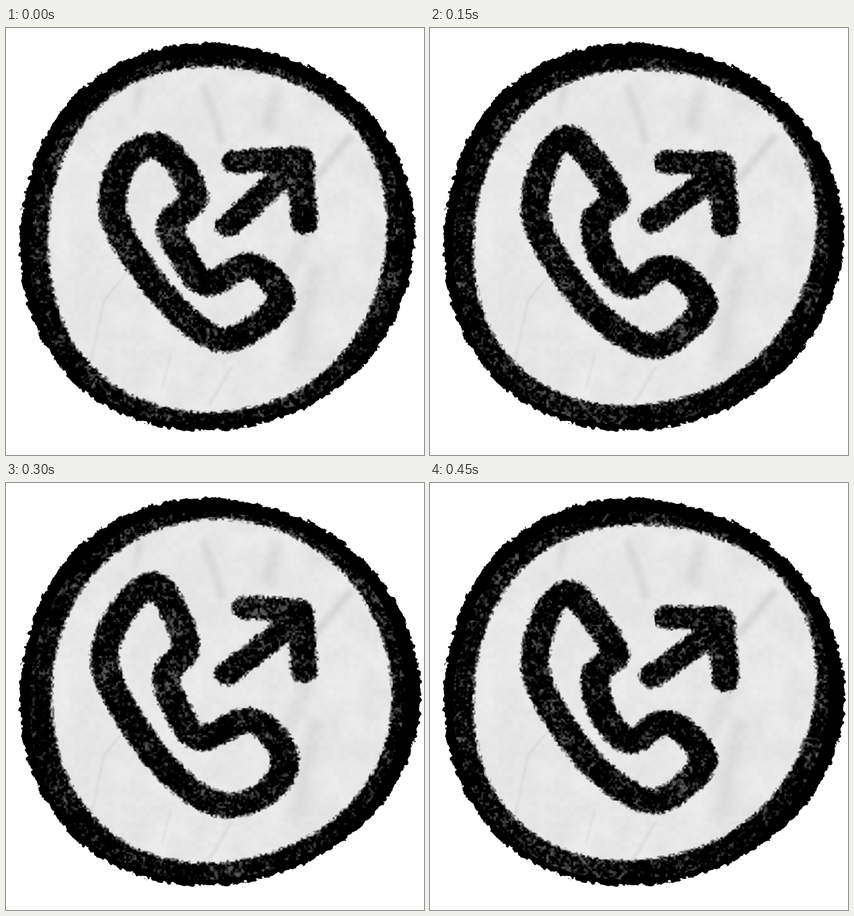
Write an HTML page with a canvas that moves like this. It is 741 px wide and 756 px high and loops after 0.6 s.

```html
<!DOCTYPE html>
<html lang="en">
<head>
<meta charset="utf-8">
<title>Outgoing call</title>
<style>
  html, body { margin: 0; width: 100%; height: 100%; overflow: hidden; background: #fff; }
  canvas { display: block; }
</style>
</head>
<body>
<canvas id="stage" width="741" height="756"></canvas>
<script>
const W = 741, H = 756, HOLD = 150, CX = 376;
const stage = document.getElementById('stage').getContext('2d');
const clamp = (v, lo = 0, hi = 1) => Math.min(hi, Math.max(lo, v));

// Wobble of a round outline: cosine and sine amounts for 1, 2, 3 and 4 waves per turn
const rimWaves = [-6, 1.2, 3.7, -2.6, 4.4, .6, -3.1, -.9];

// paper: hole in the ring; phone, head, shaft: centre lines of the chalk strokes
const poses = [
  {
    seed: 11, radius: 307, waves: [-4.4, 0, -2.9, -3.5, 3.3, -2.3, -4, -1.1],
    phone: [255,208, 290,222, 334,298, 292,345, 312,400, 355,453, 435,420,
            488,478, 440,530, 372,550, 280,475, 193,340, 205,245],
    head: [406,237, 522,230, 529,345], shaft: [394,351, 510,245]
  },
  {
    seed: 23, radius: 304, waves: [0, -3, 3.2, -8.2, 4.4, -1.6, -3.7, -1.7],
    phone: [240,195, 272,215, 328,300, 293,340, 308,410, 355,457, 420,424,
            484,484, 440,545, 375,560, 275,483, 190,345, 203,240],
    head: [420,238, 516,240, 524,350], shaft: [394,343, 505,262]
  },
  {
    seed: 37, radius: 305, waves: [2.4, -1.6, -1.4, -2.4, 4.2, 2.2, -1.9, .9],
    phone: [252,181, 283,200, 319,288, 284,340, 304,402, 345,452, 435,420,
            494,485, 460,550, 370,567, 268,487, 180,340, 192,250],
    head: [424,220, 522,227, 529,334], shaft: [392,338, 505,250]
  }
];

function layer(fill) {
  const c = document.createElement('canvas');
  c.width = W;
  c.height = H;
  const g = c.getContext('2d', { willReadFrequently: true });
  if (fill) {
    g.fillStyle = fill;
    g.fillRect(0, 0, W, H);
  }
  return g;
}

// Wobbly disc, optionally swollen towards one side
function blob(g, color, cy, radius, waves, swell = 0, side = 0) {
  g.fillStyle = color;
  g.beginPath();
  for (let a = 0; a < Math.PI * 2; a += .02) {
    let r = radius + swell * Math.max(0, Math.cos(a - side)) ** 6;
    for (let k = 1; k <= 4; k++) {
      r += waves[k * 2 - 2] * Math.cos(k * a) + waves[k * 2 - 1] * Math.sin(k * a);
    }
    g.lineTo(CX + r * Math.cos(a), cy + r * Math.sin(a));
  }
  g.fill();
}

// Closed smooth curve through flat x,y pairs
function loop(g, pts) {
  const n = pts.length / 2;
  const at = i => [pts[(i + n) % n * 2], pts[(i + n) % n * 2 + 1]];
  g.beginPath();
  g.moveTo(pts[0], pts[1]);
  for (let i = 0; i < n; i++) {
    const [a, b, c, d] = [at(i - 1), at(i), at(i + 1), at(i + 2)];
    g.bezierCurveTo(
      b[0] + (c[0] - a[0]) / 6, b[1] + (c[1] - a[1]) / 6,
      c[0] - (d[0] - b[0]) / 6, c[1] - (d[1] - b[1]) / 6, c[0], c[1]);
  }
  g.closePath();
}

function line(g, pts) {
  g.beginPath();
  for (let i = 0; i < pts.length; i += 2) g.lineTo(pts[i], pts[i + 1]);
}

// The chalk tip is wider than it is tall
function chalk(g, width) {
  g.save();
  g.strokeStyle = '#fff';
  g.lineCap = g.lineJoin = 'round';
  g.lineWidth = width;
  g.scale(1, .86);
  g.stroke();
  g.restore();
}

// Red channel as 0..1, softened
function read(g, blur) {
  const out = layer();
  out.filter = `blur(${blur}px)`;
  out.drawImage(g.canvas, 0, 0);
  const data = out.getImageData(0, 0, W, H).data;
  return Float32Array.from({ length: W * H }, (_, i) => data[i * 4] / 255);
}

function random(seed) {
  let s = seed * 7919 + 1;
  return () => {
    s = (s + 0x6D2B79F5) | 0;
    let t = Math.imul(s ^ (s >>> 15), 1 | s);
    t = (t + Math.imul(t ^ (t >>> 7), 61 | t)) ^ t;
    return ((t ^ (t >>> 14)) >>> 0) / 4294967296;
  };
}

// Smooth value noise around zero, with cells of the given size
function noise(size, seed) {
  const rnd = random(seed), cols = Math.ceil(W / size) + 2, rows = Math.ceil(H / size) + 2;
  const grid = Float32Array.from({ length: cols * rows }, () => rnd() - .5);
  const out = new Float32Array(W * H);
  const ease = t => t * t * (3 - 2 * t);
  for (let y = 0, k = 0; y < H; y++) {
    const gy = Math.floor(y / size), v = ease(y / size - gy);
    for (let x = 0; x < W; x++, k++) {
      const gx = Math.floor(x / size), u = ease(x / size - gx), i = gy * cols + gx, j = i + cols;
      const top = grid[i] + (grid[i + 1] - grid[i]) * u;
      const low = grid[j] + (grid[j + 1] - grid[j]) * u;
      out[k] = top + (low - top) * v;
    }
  }
  return out;
}

function makePaper() {
  const g = layer('#e7e7e7');
  const fold = (x1, y1, x2, y2, width, alpha) => {
    g.filter = `blur(${1 + width / 4}px)`;
    g.strokeStyle = `rgba(150,150,150,${alpha})`;
    g.lineWidth = width;
    line(g, [x1, y1, x2, y2]);
    g.stroke();
  };
  fold(238, 100, 228, 155, 12, .15);
  fold(350, 100, 384, 205, 13, .15);
  fold(482, 100, 462, 180, 22, .14);
  fold(612, 190, 545, 270, 14, .22);
  fold(535, 350, 495, 450, 24, .14);
  fold(550, 420, 510, 600, 26, .12);
  fold(150, 590, 174, 482, 2, .2);
  fold(174, 482, 212, 436, 2, .2);
  fold(276, 640, 292, 580, 2, .18);
  fold(360, 668, 400, 600, 4, .18);
  const broad = noise(34, 2), mottle = noise(9, 3), fine = noise(3, 4);
  return read(g, .5).map((v, i) => v + broad[i] * .03 + mottle[i] * .02 + fine[i] * .008);
}

// Noise may only move an edge where the mask is neither empty nor full
const near = m => Math.min(1, 5 * m * (1 - m));

const lump = noise(8, 5), nick = noise(3.5, 6);

function makeRim(swell, side) {
  const g = layer('#000');
  blob(g, '#fff', 369, 349, rimWaves, swell, side);
  return read(g, 4).map((m, i) =>
    clamp((m - .5 + near(m) * (lump[i] * .6 + nick[i] * .4)) * 8 + .5));
}

function makeInk({ seed, radius, waves, phone, head, shaft }) {
  const g = layer('#fff');
  blob(g, '#000', 372, radius, waves);
  loop(g, phone);
  chalk(g, 50);
  for (const pts of [head, shaft]) {
    line(g, pts);
    chalk(g, 47);
  }
  const fray = noise(4, seed), dust = noise(3.7, seed + 1);
  const grit = noise(7, seed + 2), drift = noise(30, seed + 3);
  return read(g, 4.2).map((m, i) => {
    const edge = clamp((m - .5 + near(m) * fray[i] * .65) * 1.8 + .5);
    const grain = dust[i] * .45 + grit[i] * .35 + drift[i] * .2;
    return edge * (1 - clamp((grain - .02) * 1.3, 0, .38));
  });
}

const paper = makePaper();

// The textured disc sits inside the solid silhouette
const discLayer = layer('#000');
blob(discLayer, '#fff', 376, 332, rimWaves);
const disc = read(discLayer, .6);

function compose(ink, rim) {
  const g = layer(), img = g.createImageData(W, H), px = img.data;
  ink.forEach((v, i) => {
    const shade = paper[i] * (1 - v) * disc[i];
    px.fill(255 * (1 - rim[i] + shade * rim[i]), i * 4, i * 4 + 3);
    px[i * 4 + 3] = 255;
  });
  g.putImageData(img, 0, 0);
  return g.canvas;
}

const [inkA, inkB, inkC] = poses.map(makeInk);
const rimA = makeRim(0, 0), rimB = makeRim(9, 0), rimC = makeRim(12, .2);
const cels = [compose(inkA, rimA), compose(inkB, rimB), compose(inkC, rimC), compose(inkB, rimC)];

let start = null;
function tick(now) {
  if (start === null) start = now;
  stage.drawImage(cels[Math.floor((now - start) / HOLD) % cels.length], 0, 0);
  requestAnimationFrame(tick);
}
stage.drawImage(cels[0], 0, 0);
requestAnimationFrame(tick);
</script>
</body>
</html>
```
